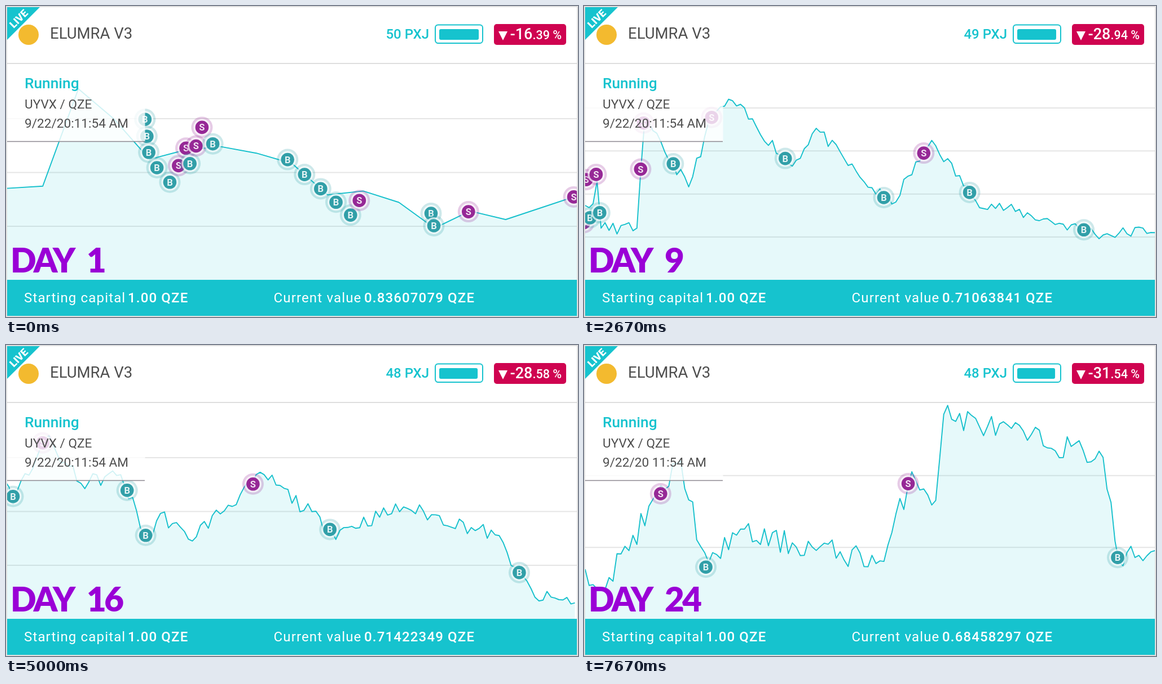
Recreate the animation shown at these times as an HTML page. Size 1014 by 552 pixels, loop 8000 ms.

```html
<!DOCTYPE html>
<html lang="en">
<head>
<meta charset="utf-8">
<title>Trading bot replay</title>
<style>
html, body { margin: 0; width: 100%; height: 100%; overflow: hidden; background: #fff; }
svg { display: block; width: 100%; height: 100%; font-family: Roboto, "Open Sans", sans-serif; }
.teal { fill: #16c3ce; }
.grey { fill: #4e4e4e; }
.white { fill: #fff; }
.strong { font-weight: 500; }
.foot { font-size: 24px; letter-spacing: 1.15px; fill: #fff; }
.day { font: 900 60px Lato, sans-serif; letter-spacing: -3.5px; fill: #9a00d6; }
.mark text { font-size: 16.5px; font-weight: 700; fill: #fff; fill-opacity: .88; text-anchor: middle; }
</style>
</head>
<body>
<svg viewBox="0 0 1014 552">
  <clipPath id="plot"><rect x="2" y="103" width="1010" height="383"/></clipPath>
  <rect width="1014" height="552" fill="#fff"/>

  <g clip-path="url(#plot)">
    <path id="grid" stroke="#e5e5e5" stroke-width="2"/>
    <path id="area" fill="#16c3ce" fill-opacity=".105"/>
    <path id="line" fill="none" stroke="#16c0cc" stroke-width="1.9" stroke-linejoin="round"/>
    <g id="marks"></g>
  </g>

  <rect x="2" y="103" width="244.5" height="137" fill="#fff" fill-opacity=".8"/>
  <path d="M2 240.5H246" stroke="#8c8890" stroke-width="1.7"/>
  <text class="teal strong" x="33" y="146" font-size="26.3">Running</text>
  <text class="grey" x="33" y="182" font-size="22.6">UYVX / QZE</text>
  <text class="grey" x="33" y="216" font-size="22.6" id="stamp"></text>

  <text class="day" x="8" y="473">DAY</text>
  <text class="day" x="143" y="473" id="day"></text>

  <path d="M2 102H1012" stroke="#dedede" stroke-width="2"/>
  <path class="teal" d="M2 2H60L2 60Z"/>
  <text class="white" transform="translate(27 27) rotate(-45)" text-anchor="middle" font-size="18" font-weight="900">LIVE</text>
  <circle cx="40" cy="51" r="18" fill="#f3ba2f"/>
  <text class="grey" x="78" y="58" font-size="27.5">ELUMRA V3</text>

  <text class="teal strong" x="750" y="58" font-size="24" text-anchor="end" id="fuel"></text>
  <rect x="761" y="33.5" width="84" height="32.5" rx="5" fill="none" stroke="#16c3ce" stroke-width="2"/>
  <rect class="teal" x="768" y="41" height="19" rx="3" id="charge"/>
  <rect x="865" y="32" width="128" height="37" rx="5" fill="#cf0350"/>
  <path class="white" d="M873 45H889L881 61Z"/>
  <text class="white strong" x="985" y="58.5" font-size="27" text-anchor="end"><tspan id="whole"></tspan><tspan id="cents" font-size="21.5"></tspan></text>

  <rect class="teal" x="2" y="486" width="1010" height="64"/>
  <text class="foot" x="32" y="526">Starting capital</text>
  <text class="foot strong" x="216" y="526">1.00 QZE</text>
  <text class="foot" x="474.5" y="526">Current value</text>
  <text class="foot strong" x="635" y="526" id="value"></text>
  <rect x="1" y="1" width="1012" height="550" fill="none" stroke="#dfdfdf" stroke-width="2"/>
</svg>
<script>
const LEFT = 2, WIDTH = 1010, BASE = 486, HEIGHT = 382;
const SPAN = 143, LOOP = 8000;
const $ = id => document.getElementById(id);

// Key points of the price: [hour, price]
const keys = [
  [0, 17], [1, 17.4], [2, 35.5], [3, 29.9], [3.85, 31], [4, 22.4], [4.6, 17.9], [5.03, 24.6],
  [5.14, 21.4], [5.48, 28.5], [5.8, 25], [7.85, 22.5], [9.7, 11.7], [10, 16.5], [11.9, 12.5],
  [12, 9.6], [13, 12.8], [14, 11.2], [16, 15.6], [17, 21.8], [19.2, 15.9], [21, 19.2],
  [22.3, 11.4], [24.2, 14.4], [25.5, 9.5], [31.5, 12.5], [38.9, 3.6], [50.9, 8.4], [51.3, 11],
  [52.3, 8.4], [53.8, 11.2], [55, 8], [64, 8], [65.7, 14.3], [77, 10.4], [83, 14.6], [88, 15.4],
  [103, 11.6], [109, 13.8], [121, 10.7], [128, 9.4], [138, 13.1], [149, 9.6], [181, 7.6],
  [197, 8], [205, 10.7], [212.5, 8], [220, 10.9], [229, 8.8], [239, 9.2], [246, 6.05], [249, 7.4],
  [256, 6.2], [275, 9.2], [292.5, 6.5], [310, 7.7], [333, 6.4], [343, 3.5], [354, 3.3],
  [367.2, .8], [392, 2.3], [393.6, 5.3], [410, 5.15], [428, 8.4], [434.6, 5.3], [441, 6.4],
  [479, 5.6], [486, 8.1], [492, 7.3], [494, 9.7], [534, 8.5], [537.8, 5.6], [547, 5.9]
];

// [day, hours charted, account value]
const log = [
  [1, 16, .83607079], [6, 136.5, .78306342], [9, 194, .71063841], [14, 305, .74457911],
  [18, 402, .68386787], [21, 475, .68452339], [24, 547, .68458297]
];

// Linear lookup of column c in rows sorted by their first column
function lookup(rows, x, c) {
  const k = rows.findIndex(r => r[0] > x);
  if (k < 0) return rows[rows.length - 1][c];
  const a = rows[k - 1], b = rows[k];
  return a[c] + (b[c] - a[c]) * (x - a[0]) / (b[0] - a[0]);
}

let seed = 11;
function random() {
  seed = (seed * 16807) % 2147483647;
  return seed / 2147483647;
}

// Hourly prices: straight on the first day, then jittered between the keys
const prices = Array.from({ length: 548 }, (_, i) => {
  const calm = i < 17 || keys.some(k => k[0] === i);
  return lookup(keys, i, 1) + (calm ? 0 : (random() - .5) * .7);
});

// The bot buys after each 4.93 % fall and sells after each 5.9 % rise since its last trade
function runBot() {
  const offset = 34, from = 2, trades = [];
  let last = 33.13;
  const next = ratio => (last + offset) * ratio - offset;
  for (let k = from; k < keys.length - 1; k++) {
    const [h0, p0] = keys[k], [h1, p1] = keys[k + 1];
    const falling = p1 < p0, ratio = falling ? .9507 : 1.059;
    while (falling ? next(ratio) >= p1 : next(ratio) <= p1) {
      last = next(ratio);
      trades.push([h0 + (h1 - h0) * (last - p0) / (p1 - p0), last, falling ? "B" : "S"]);
    }
  }
  return trades;
}
const trades = runBot();

// Round a raw step to a pleasant tick size
function tickSize(raw) {
  const mag = 10 ** Math.floor(Math.log10(raw));
  const steps = [1, 2, 2.5, 5, 10];
  const k = steps.findIndex((s, i) => i === 4 || raw / mag <= (s + steps[i + 1]) / 2);
  return steps[k] * mag;
}

function mark(x, y, side) {
  const color = side === "B" ? "#319fa8" : "#962896";
  return `<g class="mark" transform="translate(${x.toFixed(1)} ${y.toFixed(1)})">
    <circle r="19" fill="${color}" fill-opacity=".24"/>
    <circle r="15" fill="#fff" fill-opacity=".7"/>
    <circle r="11.8" fill="${color}"/>
    <text y="5.9">${side}</text></g>`;
}

function drawChart(day) {
  const end = lookup(log, day, 1);
  const start = Math.max(0, end - SPAN), first = Math.floor(start);
  const seen = prices.slice(first, Math.floor(end) + 1);
  const min = Math.min(...seen), max = Math.max(...seen);
  const tick = tickSize((max - min) / 3);
  const low = Math.floor(min / tick + .03);
  const count = Math.ceil(max / tick - .03) - low;

  const px = i => LEFT + (i - start) * WIDTH / (end - start);
  const py = v => BASE - (v / tick - low) * HEIGHT / count;

  let grid = "";
  for (let k = 1; k < count; k++) grid += `M2 ${BASE + .5 - k * HEIGHT / count}H1012`;
  const path = "M" + seen.map((v, k) => px(first + k).toFixed(1) + " " + py(v).toFixed(1)).join("L");

  $("grid").setAttribute("d", grid);
  $("line").setAttribute("d", path);
  $("area").setAttribute("d", `${path}V${BASE}H${px(first)}Z`);
  $("marks").innerHTML = trades
    .filter(t => t[0] <= end && px(t[0]) > -20)
    .map(([i, v, side]) => mark(px(i), py(v), side)).join("");
}

function drawDay(day) {
  drawChart(day);
  const value = lookup(log, day, 2);
  const [whole, cents] = ((value - 1) * 100).toFixed(2).split(".");
  $("day").textContent = day;
  $("stamp").textContent = `9/22/20${day > 22 ? " " : ":"}11:54 AM`;
  $("fuel").textContent = `${Math.round(50.2 - day / 9)} PXJ`;
  $("charge").setAttribute("width", 70.2 - day * .13);
  $("whole").textContent = whole;
  $("cents").textContent = `.${cents} %`;
  $("value").textContent = `${value.toFixed(8)} QZE`;
}

let shown = 0;
const began = performance.now();
function update(now) {
  const t = Math.max(0, now - began) % LOOP, ms = t % 1000;
  const day = 1 + 3 * Math.floor(t / 1000) + (ms >= 330) + (ms >= 670);
  if (day !== shown) drawDay(shown = day);
  requestAnimationFrame(update);
}
update(began);
</script>
</body>
</html>
```
